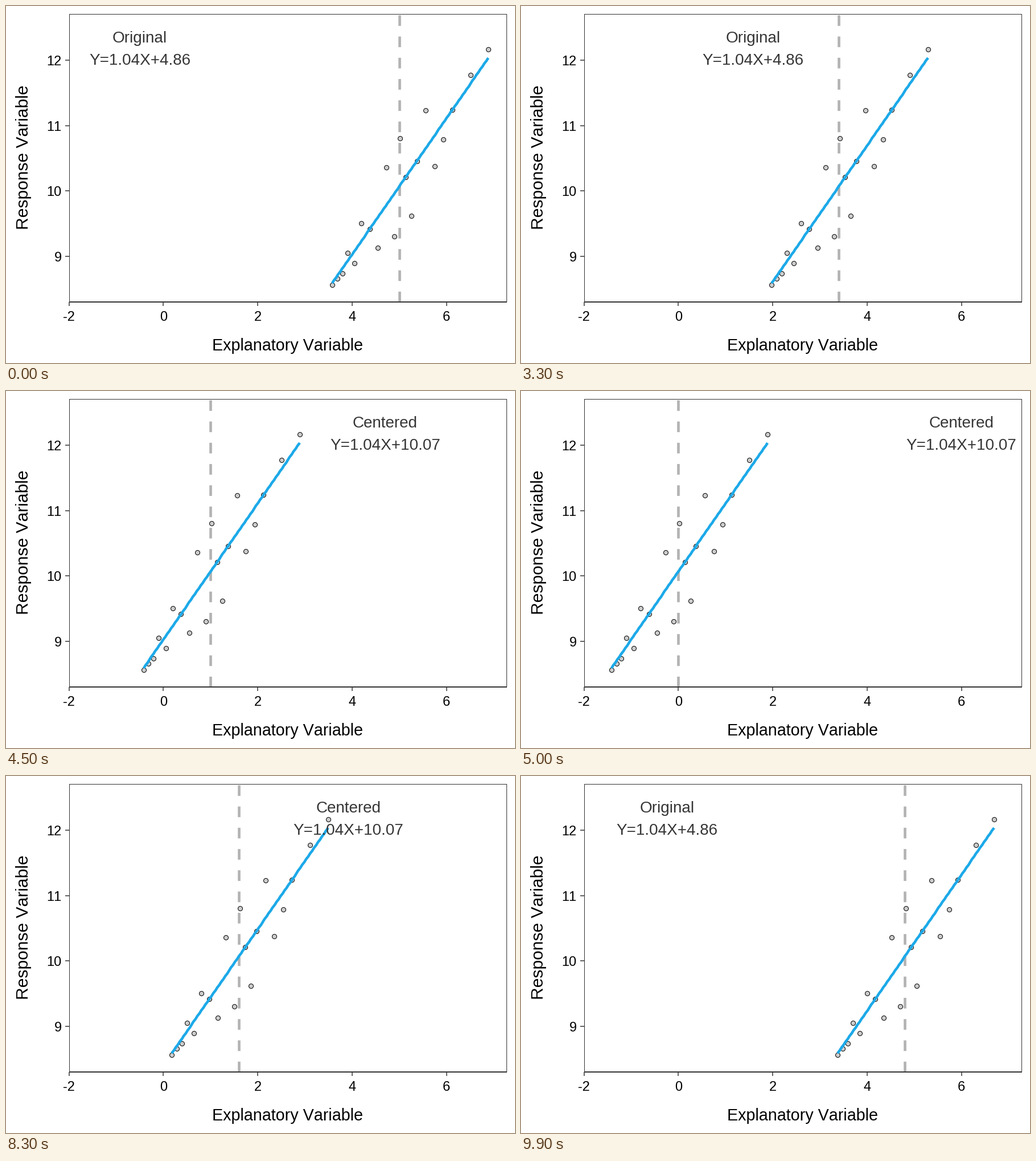
These frames come from a looping animation (894x626 px, 10000 ms). A matplotlib script:

```python
import numpy as np
import matplotlib.pyplot as plt
from matplotlib.animation import FuncAnimation

W, H, DPI = 894, 626, 100
PX = 72 / DPI                      # points per pixel
LEFT, RIGHT, TOP, BOTTOM = 110.5, 878.5, 13.5, 519
XUNIT, YUNIT = 82.85, 114.5        # pixels per data unit
DARK, GREY, BLUE = "#333333", "#b3b3b3", "#1ca9e8"
MEAN, SLOPE, CENTER_Y = 5, 1.0426, 10.07
STEPS, HOLD, FRAMES = 25, 26, 100

plt.rcParams["font.family"] = "Liberation Sans"
plt.rcParams["text.kerning_factor"] = 6


def x_px(x):
    return 276.4 + XUNIT * x


def y_px(y):
    return 324.3 - YUNIT * (y - 10)


def trend(dx):
    return CENTER_Y + SLOPE * dx


def sample(n=20):
    """Offsets from the mean x, and y swinging about the trend."""
    k = np.arange(n)
    dx = np.interp(k, [0, 3, 5, 9, 13, 17, 19],
                   [-1.42, -1.1, -0.8, -0.1, 0.375, 1.125, 1.89])
    turns = [2, 3, 4, 5, 7, 8, 9, 10, 12, 14, 15, 19]
    phase = np.pi * np.interp(k, turns, range(len(turns)))
    spread = 0.74 * np.exp(-((k - 11) / 6) ** 2)
    return dx, trend(dx) - spread * np.cos(phase)


DX, Y = sample()
FIT_DX = np.linspace(DX[0], DX[-1], 80)

fig = plt.figure(figsize=(W / DPI, H / DPI), dpi=DPI, facecolor="white")
ax = fig.add_axes([0, 0, 1, 1])
ax.set_xlim(0, W)
ax.set_ylim(H, 0)
ax.axis("off")


def line(xs, ys, color, width, z, **kw):
    return ax.plot(xs, ys, color=color, lw=width * PX, zorder=z,
                   solid_capstyle="butt", dash_capstyle="butt", **kw)[0]


def text(x, y, s, px, color="black", ha="center", **kw):
    return ax.text(x, y, s, size=px * PX, color=color, ha=ha,
                   va="baseline", zorder=6, **kw)


# Frame, ticks and titles
line([LEFT, RIGHT, RIGHT, LEFT, LEFT], [TOP, TOP, BOTTOM, BOTTOM, TOP],
     DARK, 1, 5)
line([LEFT, RIGHT], [BOTTOM] * 2, DARK, 2, 5)
for v in range(-2, 7, 2):
    line([x_px(v)] * 2, [BOTTOM, BOTTOM + 7], DARK, 1.5, 5)
    text(x_px(v), 552.5, str(v), 23.6)
for v in range(9, 13):
    line([LEFT - 7, LEFT], [y_px(v)] * 2, DARK, 1.5, 5)
    text(97.5, y_px(v) + 9, str(v), 23.6, ha="right")
text(494.5, 604, "Explanatory Variable", 28.75)
text(39.5, 265.5, "Response Variable", 30, rotation=90,
     rotation_mode="anchor")

# Moving parts
mean = line([0, 0], [BOTTOM, TOP], GREY, 4.66, 1, dashes=(4, 4))
dots = ax.plot([], [], "o", ms=8 * PX, mfc="#cccccc", mec="black",
               mew=PX, zorder=2)[0]
fit = line([], [], BLUE, 4.6, 3)
name = text(0, 63.5, "", 27.9, "#363636")
formula = text(0, 103.3, "", 27.9, "#363636")


def progress(i):
    """0 = raw x, 1 = x centred on its mean."""
    there = np.clip(i - HOLD + 1, 0, STEPS)
    back = np.clip(i - HOLD - 2 * STEPS + 1, 0, STEPS)
    return (there - back) / STEPS


def draw(i):
    p = progress(i)
    m = MEAN * (1 - p)
    mean.set_xdata([x_px(m)] * 2)
    dots.set_data(x_px(m + DX), y_px(Y))
    fit.set_data(np.round(x_px(m + FIT_DX)), np.round(y_px(trend(FIT_DX))))
    centered = p > 0.5
    name.set_text("Centered" if centered else "Original")
    formula.set_text("Y=1.04X+10.07" if centered else "Y=1.04X+4.86")
    for label in (name, formula):
        label.set_x(x_px(-0.5 + 6.5 * p))
    return mean, dots, fit, name, formula


anim = FuncAnimation(fig, draw, frames=FRAMES, interval=100,
                     init_func=lambda: draw(0), repeat=True,
                     repeat_delay=0, blit=False)
plt.show()
```
